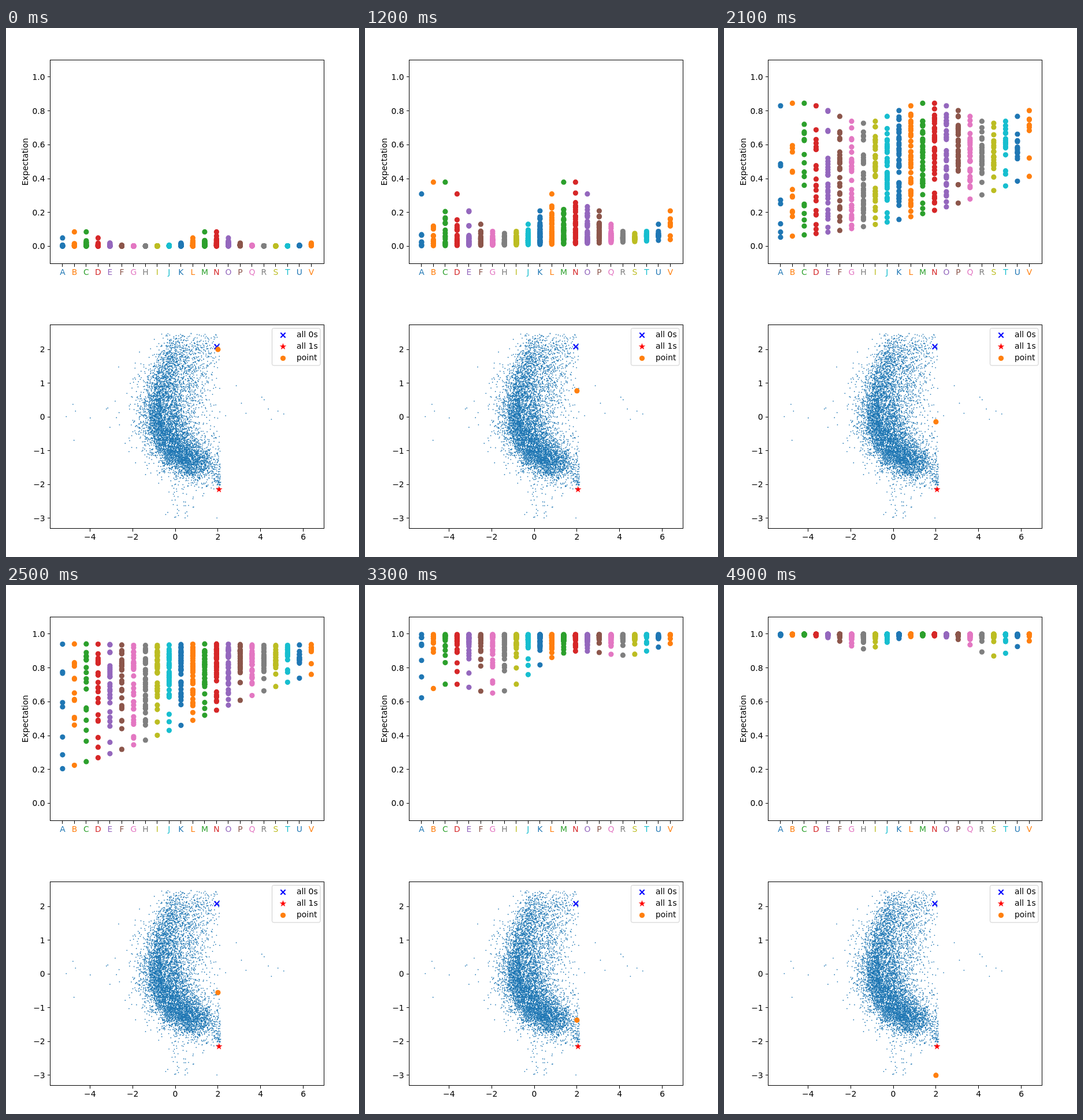
An HTML page for the animation above (5 s loop, 611 px wide and 917 px high).

```html
<!DOCTYPE html>
<html lang="en">
<head>
<meta charset="utf-8">
<title>Expectation by latent point</title>
<style>
html, body { margin: 0; width: 100%; height: 100%; overflow: hidden; background: #fff; }
svg { display: block; width: 611px; height: 917px; font: 13.89px "DejaVu Sans", sans-serif; }
.axis { fill: none; stroke: #000; shape-rendering: crispEdges; }
.cloud { fill: none; stroke: #1f77b4; stroke-width: 1.75; stroke-linecap: round; }
.cross { fill: none; stroke: #00f; stroke-width: 2.08; }
.star { fill: #f00; stroke: #f00; stroke-width: 1.2; }
</style>
</head>
<body>
<svg id="stage" viewBox="0 0 611 917"></svg>
<script>
const COLORS = ['#1f77b4', '#ff7f0e', '#2ca02c', '#d62728', '#9467bd',
  '#8c564b', '#e377c2', '#7f7f7f', '#bcbd22', '#17becf'];
const LETTERS = [...'ABCDEFGHIJKLMNOPQRSTUV'];

// Mean logits of the highest and lowest dots at key steps
const TIMES = [0, 8, 16, 25, 33, 41, 49];
const HIGH = [-4.2, -2.6, -.35, 2.7, 5.8, 6.9, 7.6];
const LOW = [-7.2, -5.4, -3.5, -.1, 1.5, 2.6, 3.4];

let seed = 4217;
const rand = () => (seed = seed * 16807 % 2147483647) / 2147483647;
const gauss = () => Math.sqrt(-2 * Math.log(rand())) * Math.cos(2 * Math.PI * rand());
const sigmoid = z => 1 / (1 + Math.exp(-z));
const range = (n, f) => Array.from({ length: n }, (_, i) => f(i));

const colX = i => 97.9 + 20.5 * i;
const valY = v => 378.4 - 293.5 * v;
const X = x => 293 + 36.93 * x;
const Y = y => 674.3 - 58.55 * y;

const text = (x, y, s, anchor = 'start', fill = '#000') =>
  `<text x="${x}" y="${y}" text-anchor="${anchor}" fill="${fill}">${s}</text>`;
const label = v => String(v).replace('-', '−');
const line = d => `<path class="axis" d="${d}"/>`;
const frame = y => line(`M76.5 ${y}h474v353h-474z`);
const tickY = (y, s) => line(`M72 ${Math.floor(y) + .5}h4.5`) + text(67.6, Math.round(y + 5), s, 'end');
const tickX = (x, y, s, fill) =>
  line(`M${Math.floor(x) + .5} ${y}v5`) + text(x, y + 19.5, s, 'middle', fill);
const dot = (x, y, fill, id = '') => `<circle ${id} cx="${x}" cy="${y}" r="4.6" fill="${fill}"/>`;
const cross = (x, y) =>
  `<path class="cross" d="M${x - 4.17} ${y - 4.17}l8.34 8.34m0 -8.34l-8.34 8.34"/>`;
const star = (x, y) => {
  const pts = range(10, i => {
    const r = i % 2 ? 1.6 : 4.17, a = i * Math.PI / 5;
    return [x + r * Math.sin(a), y - r * Math.cos(a)];
  });
  return `<polygon class="star" points="${pts.join(' ')}"/>`;
};

function bezier(t, a, b, c, d) {
  const s = 1 - t;
  return s * s * s * a + 3 * s * s * t * b + 3 * s * t * t * c + t * t * t * d;
}

function cloud() {
  const pts = [];
  // Crescent with a soft inner side
  for (let i = 0; i < 7400; i++) {
    const t = .94 * rand() ** .65, g = gauss(), kind = rand();
    let dx = .4 * g * (g > 0 ? 1 + 1.5 * (1 - t) : 1);
    if (kind < .14) dx += 1.1 * Math.abs(gauss());
    else if (kind < .22) dx -= .6 * Math.abs(gauss());
    const x = bezier(t, .5, -.85, -1.7, 1.75) + dx;
    const y = bezier(t, 2.4, .9, -1, -1.6) + .27 * gauss();
    if (x < 2.1 && y < 2.48 && y > -2.1) pts.push([x, y]);
  }
  // Sparse tail below, clumps near both markers
  for (let i = 0; i < 55; i++) {
    pts.push([.45 + .6 * gauss(), -1.95 - 1.05 * rand() ** 1.5]);
    pts.push([Math.min(2.15, 1.97 + .09 * gauss()), -1.85 + .17 * gauss()]);
    pts.push([Math.min(2.1, 1.35 + .35 * gauss()), Math.min(2.4, 1.95 + .22 * gauss())]);
  }
  // Outliers on both sides
  for (let i = 0; i < 10; i++) {
    pts.push([-2.6 - 2.6 * rand() ** 2, .6 * gauss()]);
    pts.push([2.3 + 3 * rand(), .3 + .4 * gauss()]);
  }
  const d = pts.map(([x, y]) => `M${X(x).toFixed(1)} ${Y(y).toFixed(1)}h0`).join('');
  return `<path class="cloud" d="${d}"/>`;
}

// Lowest and highest logit of a column: mean curves bent by a wave and a tilt across columns
function extremes(col, step) {
  const j = Math.min(5, TIMES.findLastIndex(t => t <= step));
  const f = (step - TIMES[j]) / (TIMES[j + 1] - TIMES[j]);
  const at = curve => curve[j] + (curve[j + 1] - curve[j]) * f;
  const wave = Math.cos(2 * Math.PI * (col - 1.5) / 11);
  const tilt = (col - 10.5) * (.12 - .01 * Math.max(0, step - 33));
  const high = at(HIGH) + wave * 1.9 * Math.max(0, 1 - step / 26);
  const low = at(LOW) + tilt + wave * .05 * Math.max(0, step - 25);
  return [Math.min(low, high - .8), high];
}

// Each dot keeps its rank between the column's extremes; ranks bunch in the middle
const dots = LETTERS.flatMap((_, col) => {
  const n = Math.round(6 + 32 * Math.sin(Math.PI * (col + .5) / 22));
  return range(n, i => {
    const v = i < 2 ? i : rand();
    return { col, rank: .5 - Math.sin(Math.asin(1 - 2 * v) / 3) };
  });
});

const stage = document.getElementById('stage');
stage.innerHTML =
  `<g id="dots">${dots.map(d => dot(colX(d.col), 0, COLORS[d.col % 10])).join('')}</g>` +
  cloud() + frame(55.5) + frame(514.5) +
  range(6, i => tickY(valY(i / 5), (i / 5).toFixed(1))).join('') +
  LETTERS.map((s, i) => tickX(colX(i), 408.5, s, COLORS[i % 10])).join('') +
  range(6, i => tickY(Y(i - 3), label(i - 3))).join('') +
  range(6, i => tickX(X(2 * i - 4), 867.5, label(2 * i - 4))).join('') +
  `<g transform="translate(38 232) rotate(-90)">${text(0, 0, 'Expectation', 'middle')}</g>` +
  cross(364.9, 552.5) + star(368.7, 800) +
  '<rect x="460.5" y="520.5" width="83.5" height="64.5" rx="2.8" fill="#fff" fill-opacity=".8" stroke="#ccc"/>' +
  cross(479.5, 532.5) + star(479.5, 552.3) + dot(479.5, 572.5, COLORS[1]) +
  ['all 0s', 'all 1s', 'point'].map((s, i) => text(503, 536 + 20 * i, s)).join('') +
  dot(X(2), 0, COLORS[1], 'id="point"');

const circles = document.getElementById('dots').children;
const point = document.getElementById('point');
let shown = -1;

function draw() {
  const step = Math.floor(performance.now() / 100) % 50;
  if (step !== shown) {
    shown = step;
    const spans = LETTERS.map((_, col) => extremes(col, step));
    dots.forEach((d, i) => {
      const [low, high] = spans[d.col];
      circles[i].setAttribute('cy', valY(sigmoid(low + (high - low) * d.rank)));
    });
    point.setAttribute('cy', Y(2 - 5 * step / 49));
  }
  requestAnimationFrame(draw);
}
draw();
</script>
</body>
</html>
```
